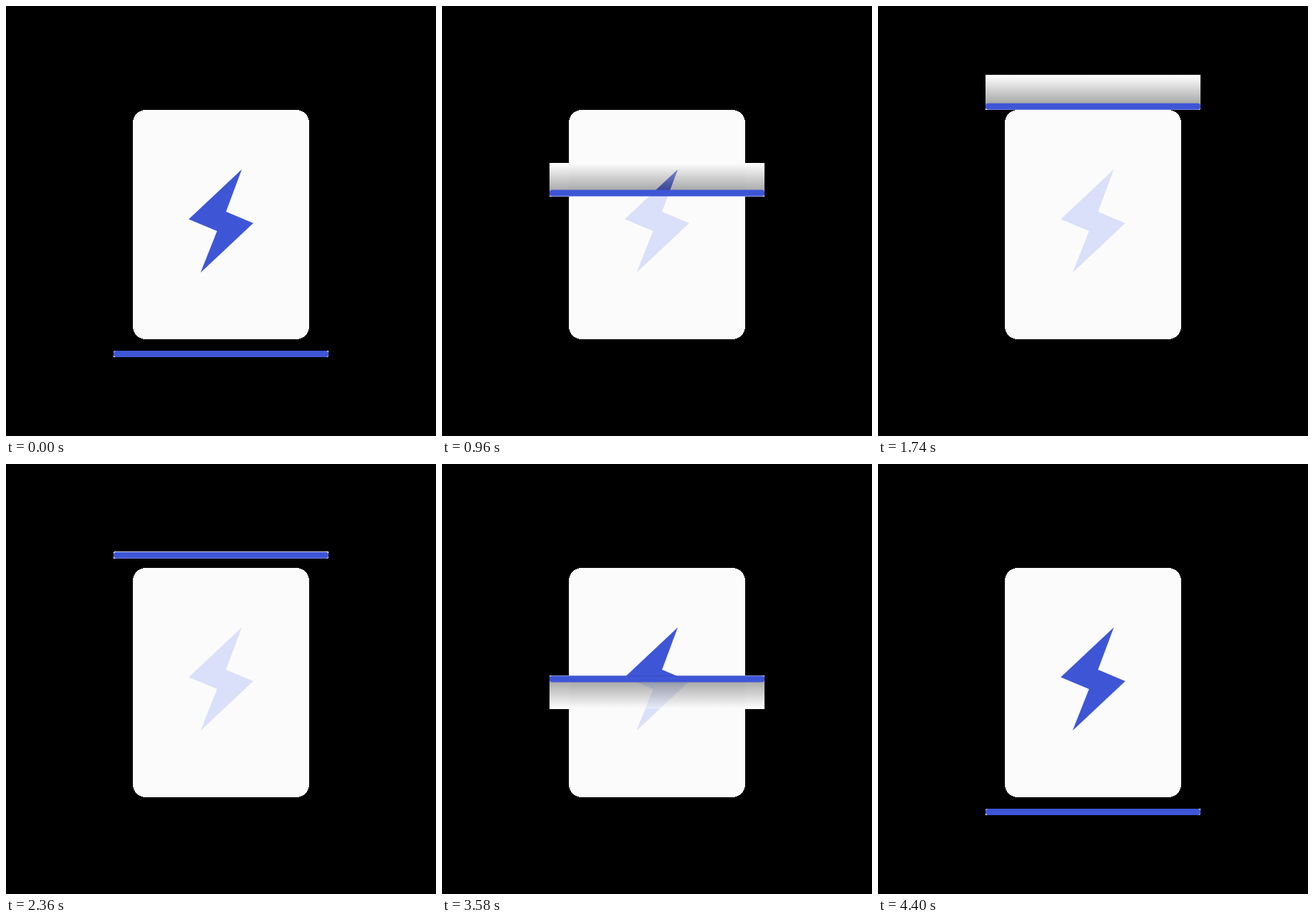
An HTML page that plays this animation: 600 by 600 pixels, repeating every 4540 ms.

```html
<!DOCTYPE html>
<html lang="en">
<head>
<meta charset="utf-8">
<title>Scanner</title>
<style>
  html, body { margin: 0; width: 100%; height: 100%; overflow: hidden; background: #000; }
  svg { display: block; width: 100vw; height: 100vh; }
</style>
</head>
<body>
<svg viewBox="0 0 600 600">
  <defs>
    <linearGradient id="fade" x1="0" y1="0" x2="0" y2="1">
      <stop offset="0" stop-color="#fff"/>
      <stop offset="1" stop-color="#000"/>
    </linearGradient>
    <clipPath id="above"><rect id="reveal" width="600" height="600"/></clipPath>
    <path id="bolt" d="M329 228L307 287L345 303L271.5 372L294.5 314L255 297.5Z"/>
  </defs>
  <rect id="shadeBack" x="150" width="300" height="46" fill="#fff"/>
  <rect id="barBack" x="150" width="300" height="9" rx="2" fill="#fff" shape-rendering="crispEdges"/>
  <rect x="177" y="145" width="246" height="320" rx="18" fill="#fbfbfb" shape-rendering="crispEdges"/>
  <use href="#bolt" fill="#dae0f9"/>
  <g clip-path="url(#above)"><use href="#bolt" fill="#3e56d6"/></g>
  <g id="shade" opacity=".4"><rect x="150" y="-23" width="300" height="46" fill="url(#fade)"/></g>
  <rect id="bar" x="150" width="300" height="9" rx="4" fill="#3e56d6"/>
</svg>
<script>
  const LOOP = 4540, STEP = 20, SWEEP = 2200;
  const LOW = 481, HIGH = 121, BAR = 9, SHADE = 46;
  const UP = [20, 2140], DOWN = [2440, 4390];

  const $ = id => document.getElementById(id);
  const shade = $('shade'), shadeBack = $('shadeBack');
  const bar = $('bar'), barBack = $('barBack'), reveal = $('reveal');

  const within = (t, [a, b]) => t >= a && t < b;
  const curve = (s, a, b) => 3 * (1 - s) * (1 - s) * s * a + 3 * (1 - s) * s * s * b + s * s * s;

  function ease(x) {
    let lo = 0, hi = 1;
    for (let i = 0; i < 30; i++) {
      const mid = (lo + hi) / 2;
      if (curve(mid, 0.273, 0.365) < x) lo = mid; else hi = mid;
    }
    return curve(lo, 0, 1);
  }

  // Opaque backing, snapped outward to whole pixels
  function snap(rect, top, height) {
    const y = Math.floor(top + 0.05);
    rect.setAttribute('y', y);
    rect.setAttribute('height', Math.ceil(top + height - 0.05) - y);
  }

  function draw(t) {
    // The way down is the way up played backwards
    const x = Math.max(0, 1 - Math.abs(t - SWEEP) / SWEEP);
    const p = x > 0 ? ease(x) : 0;
    const y = LOW + (HIGH - LOW) * p;
    const reach = 35 + 4 * p;
    const rising = t < SWEEP;
    const top = rising ? y - reach : y + BAR + reach - SHADE;
    const visible = within(t, UP) || within(t, DOWN) ? 'visible' : 'hidden';

    bar.setAttribute('y', y);
    snap(barBack, y, BAR);
    reveal.setAttribute('height', y + BAR / 2);

    shade.setAttribute('visibility', visible);
    shadeBack.setAttribute('visibility', visible);
    shade.setAttribute('transform', `translate(0 ${top + SHADE / 2}) scale(1 ${rising ? 1 : -1})`);
    snap(shadeBack, top, SHADE);
  }

  function tick() {
    const t = performance.now() % LOOP;
    draw(Math.floor(t / STEP) * STEP);
    requestAnimationFrame(tick);
  }
  tick();
</script>
</body>
</html>
```
